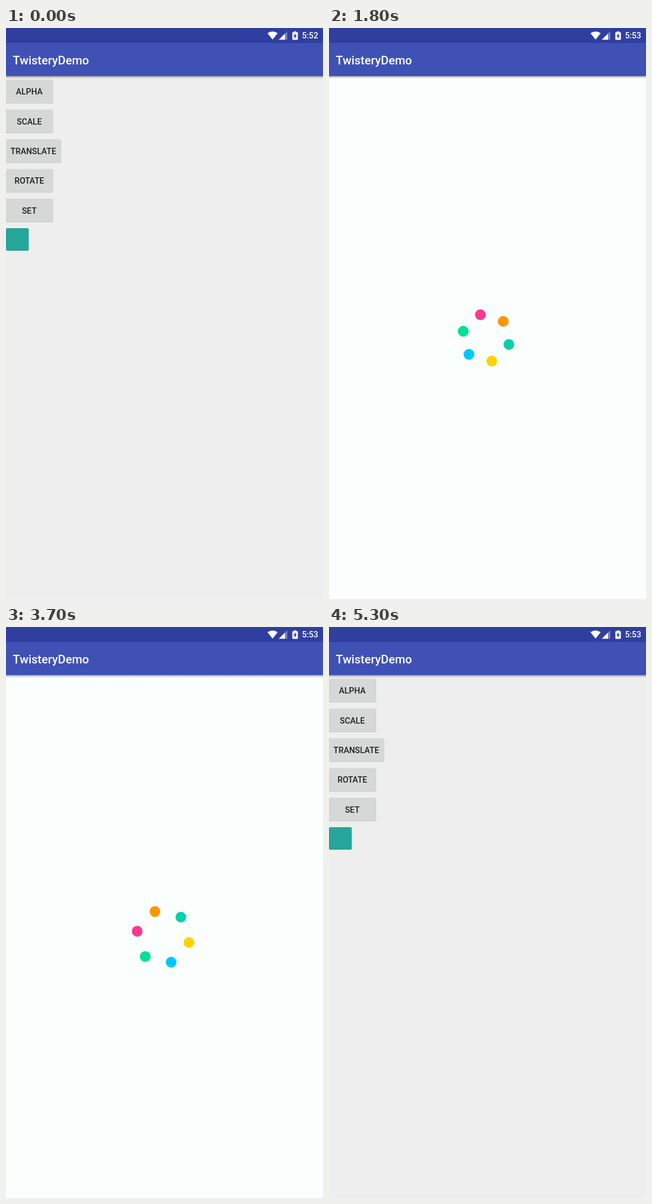
Recreate the animation shown at these times as an HTML page with a canvas. Size 550 by 987 pixels, loop 5.9 s.

```html
<!DOCTYPE html>
<html lang="en">
<head>
<meta charset="utf-8">
<title>Splash demo</title>
<style>
html, body { margin: 0; width: 100%; height: 100%; overflow: hidden; background: #eee; }
canvas { display: block; width: 550px; height: 987px; }
</style>
</head>
<body>
<canvas id="stage"></canvas>
<script>
const W = 550, H = 987, LOOP = 5900, STEP = 100;
const TAU = Math.PI * 2;
const CX = 272.5, CY = 535.6, RING = 41.2, DOT = 9.3;
const SPLASH_START = 400, MERGE_START = 2950, MERGE_TIME = 1420;
const HOLE_START = 4348, HOLE_TIME = 1364, HOLE_MAX = 1057;
const COLORS = ['#ff9600', '#02d1ac', '#ffd200', '#00c6ff', '#00e099', '#ff3891'];
// time in ms, angle of the first dot in degrees
const SPIN = [[400, 0], [1000, 107.8], [1800, 316.1], [2500, 500.1], [2926, 612.2]];

const canvas = document.getElementById('stage');
const dpr = window.devicePixelRatio || 1;
canvas.width = W * dpr;
canvas.height = H * dpr;
const ctx = canvas.getContext('2d');
ctx.scale(dpr, dpr);

function rect(x, y, w, h, color) {
  ctx.fillStyle = color;
  ctx.fillRect(x, y, w, h);
}

function roundRect(x, y, w, h, r, color) {
  ctx.fillStyle = color;
  ctx.beginPath();
  ctx.roundRect(x, y, w, h, r);
  ctx.fill();
}

function poly(points, color) {
  ctx.fillStyle = color;
  ctx.beginPath();
  points.forEach(([x, y]) => ctx.lineTo(x, y));
  ctx.closePath();
  ctx.fill();
}

function label(text, x, y, size, color, align) {
  ctx.font = `500 ${size}px Roboto, sans-serif`;
  ctx.textAlign = align;
  ctx.fillStyle = color;
  ctx.fillText(text, x, y);
}

function keyed(keys, t) {
  if (t <= keys[0][0]) return keys[0][1];
  for (let i = 1; i < keys.length; i++) {
    const [t0, v0] = keys[i - 1], [t1, v1] = keys[i];
    if (t < t1) return v0 + (v1 - v0) * (t - t0) / (t1 - t0);
  }
  return keys[keys.length - 1][1];
}

function drawButton(text, row, w) {
  const y = 89.5 + row * 51.4;
  roundRect(-3, y + 1, w + 3.5, 40, 2, 'rgba(0,0,0,0.13)');
  roundRect(-3, y, w + 3, 39.5, 2, '#d6d7d7');
  label(text, w / 2 - 0.2, y + 25.7, 14.3, '#1f1f1f', 'center');
}

function drawMenu() {
  rect(0, 83, W, H - 83, '#eeeeee');
  ['ALPHA', 'SCALE', 'TRANSLATE', 'ROTATE', 'SET'].forEach((text, i) =>
    drawButton(text, i, i === 2 ? 95.3 : 81.3));
  roundRect(0, 346, 39.5, 39, 2, '#26a69a');
}

function drawBars(clock) {
  const shade = ctx.createLinearGradient(0, 83, 0, 88);
  shade.addColorStop(0, 'rgba(0,0,0,0.38)');
  shade.addColorStop(0.5, 'rgba(0,0,0,0.13)');
  shade.addColorStop(1, 'rgba(0,0,0,0)');
  rect(0, 83, W, 5, shade);
  rect(0, 26, W, 57, '#3f51b5');
  rect(0, 0, W, 26, '#303f9f');
  label('TwisteryDemo', 11.8, 63, 20.5, '#fff', 'left');
  label(clock, 541.6, 18.4, 14.3, '#fff', 'right');

  // wifi
  ctx.fillStyle = '#fff';
  ctx.beginPath();
  ctx.moveTo(462.5, 20);
  ctx.lineTo(453.6, 9);
  ctx.quadraticCurveTo(462.5, 2.8, 471.4, 9);
  ctx.closePath();
  ctx.fill();

  // signal
  poly([[473.4, 20.2], [488, 20.2], [488, 5.8]], 'rgba(255,255,255,0.35)');
  poly([[473.4, 20.2], [484, 20.2], [484, 9.7]], '#fff');

  // battery
  rect(499.6, 5.8, 4, 2, '#fff');
  roundRect(496.8, 7.2, 9.6, 13.2, 1, '#fff');
  poly([[502.3, 9], [498.7, 14.6], [500.9, 14.6], [500.9, 18.5], [504.5, 12.9], [502.3, 12.9]], '#303f9f');
}

function holeRadius(t) {
  // the reveal pauses briefly before it opens up
  const time = t < 4600 ? t : t < 4900 ? 4600 : t - 200;
  const p = Math.min(1, (time - HOLE_START) / HOLE_TIME);
  return DOT + (HOLE_MAX - DOT) * (1 - Math.cos(Math.PI * p)) / 2;
}

function drawHole(r) {
  ctx.fillStyle = '#fafffe';
  ctx.beginPath();
  ctx.rect(0, 83, W, H - 83);
  for (let i = 0; i <= 180; i++) {
    const a = i / 180 * TAU;
    const k = r * (1 + 0.01 * (1 - Math.cos(8 * a)));
    const x = CX + k * Math.cos(a), y = CY + k * Math.sin(a);
    i ? ctx.lineTo(x, y) : ctx.moveTo(x, y);
  }
  ctx.closePath();
  ctx.fill('evenodd');
}

function drawDots(t) {
  const u = -Math.min(1, Math.max(0, (t - MERGE_START) / MERGE_TIME));
  const r = RING * (1 + u * u * (3 * u + 2));
  const turn = keyed(SPIN, t) / 360 * TAU;
  COLORS.forEach((color, i) => {
    const a = turn + i * TAU / 6;
    ctx.fillStyle = color;
    ctx.beginPath();
    ctx.arc(CX + r * Math.cos(a), CY + r * Math.sin(a), DOT, 0, TAU);
    ctx.fill();
  });
}

function draw(t) {
  const splash = t >= SPLASH_START && t < 5300;
  ctx.clearRect(0, 0, W, H);
  drawMenu();
  if (splash && t < HOLE_START) {
    rect(0, 83, W, H - 83, '#fafffe');
    drawDots(t);
  } else if (splash) {
    ctx.save();
    ctx.beginPath();
    ctx.rect(0, 83, W, H - 83);
    ctx.clip();
    drawHole(holeRadius(t));
    ctx.restore();
  }
  drawBars(t < SPLASH_START ? '5:52' : '5:53');
}

const start = performance.now();
function tick() {
  const t = (performance.now() - start) % LOOP;
  draw(Math.floor(t / STEP) * STEP);
  requestAnimationFrame(tick);
}
tick();
</script>
</body>
</html>
```
